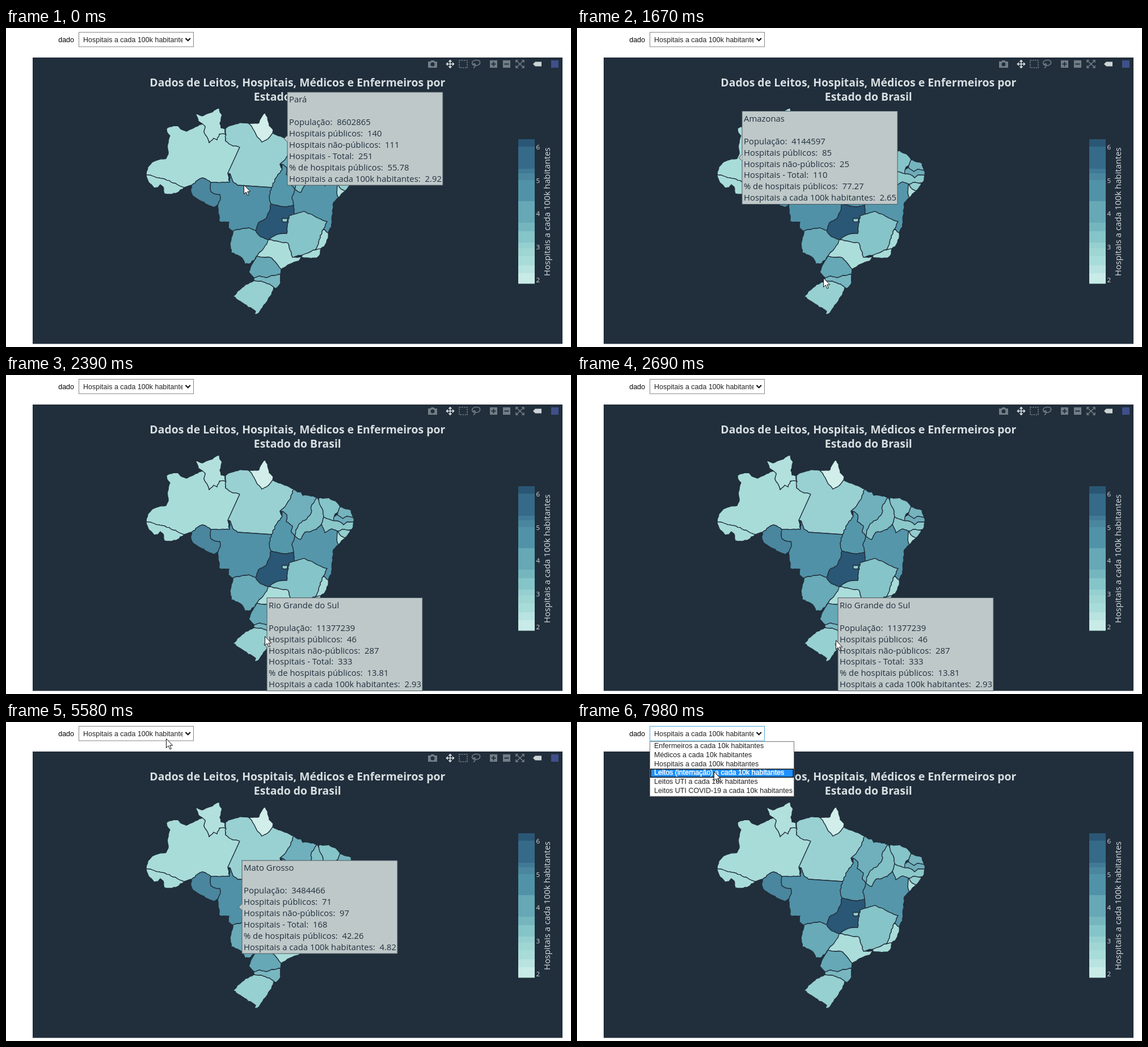
Recreate the animation shown at these times as an HTML page. Size 996 by 562 pixels, loop 8000 ms.

```html
<!DOCTYPE html>
<html lang="pt">
<head>
<meta charset="utf-8">
<title>Hospitais por estado</title>
<style>
  html, body { margin: 0; width: 100%; height: 100%; overflow: hidden; background: #fff; }
  svg { display: block; width: 100%; height: 100%; }
  .ui { font: 12.5px "Liberation Sans", Arial, sans-serif; fill: #222; }
  .plot { font: 14.8px "Open Sans", "Noto Sans", sans-serif; fill: #d8dfe2; }
  .title { font-size: 19.4px; font-weight: 700; text-anchor: middle; }
  .ticks { font-size: 11.6px; }
  #map { stroke: #212e3b; stroke-width: 1.3; stroke-linejoin: round; }
  #tip rect, #tip path { fill: #bec8c8; stroke: #4c5a62; }
  #tip text { fill: #22303f; font-size: 14.88px; }
  #bar { fill: none; stroke: #727e87; stroke-width: 1.6; }
  #bar .solid { fill: #727e87; stroke: none; }
</style>
</head>
<body>
<svg viewBox="0 0 996 562">
  <rect width="996" height="562" fill="#fff"/>
  <rect x="47" y="52" width="934" height="504.5" fill="#212e3b"/>

  <g class="plot">
    <g class="title">
      <text x="513.8" y="103">Dados de Leitos, Hospitais, Médicos e Enfermeiros por</text>
      <text x="513.8" y="128">Estado do Brasil</text>
    </g>
    <g id="scale"></g>
    <g id="ticks" class="ticks"></g>
    <text transform="translate(958.5 437) rotate(-90)">Hospitais a cada 100k habitantes</text>
  </g>

  <g id="map">
    <polygon fill="#a8dcd9" points="283,177 288,174 303,172 308,178 318,182 331,176 340,171 350,169 351,173 349,183 353,190 358,202 366,194 372,197 376,187 387,187 387,199 397,206 412,210 391,256 394,272 361,272 355,268 346,264 338,268 327,277 314,281 302,276 280,266 262,262 247,258 250,245 257,237 269,232 282,230 286,222 285,205 289,190 284,184"/>
    <polygon fill="#b2e0dd" points="334,151 345,155 352,152 364,148 372,142 376,141 377,148 381,153 379,160 377,168 379,176 386,178 387,187 376,187 372,197 366,194 358,202 353,190 349,183 351,173 345,168 339,164 337,157"/>
    <polygon fill="#a8dcd9" points="247,258 262,262 280,266 302,276 314,281 302,290 292,293 279,292 277,280 272,276 268,281 261,282 251,271"/>
    <polygon fill="#99d1d2" points="387,177 392,173 405,169 417,167 428,168 437,180 443,192 451,201 462,195 470,185 480,190 491,194 507,201 502,216 492,232 483,240 487,249 476,264 468,281 408,277 400,271 395,257 391,256 412,210 397,206 387,199"/>
    <polygon fill="#d1eeea" points="428,168 436,168 446,167 451,156 457,149 461,157 464,172 471,179 470,185 462,195 451,201 443,192 437,180"/>
    <polygon fill="#4a869e" points="327,277 338,268 346,264 355,268 361,272 361,288 367,292 377,293 378,302 374,311 367,316 355,311 342,304 331,297 326,288"/>
    <polygon fill="#5091a7" points="361,272 394,272 395,257 400,271 408,277 468,281 464,296 467,310 465,322 458,336 445,343 440,357 428,352 408,355 400,358 392,352 393,342 376,341 374,318 374,311 378,302 377,293 367,292 361,288"/>
    <polygon fill="#5597aa" points="487,240 495,246 494,258 505,266 503,277 509,284 504,300 507,312 495,315 480,313 467,310 464,296 468,281 476,264 487,249"/>
    <polygon fill="#6fb0bc" points="507,201 514,206 520,206 523,212 534,212 549,216 544,222 538,232 538,243 530,254 517,262 511,273 509,284 503,277 505,266 494,258 495,246 487,240 483,240 492,232 502,216"/>
    <polygon fill="#82c1c6" points="549,216 554,230 559,240 560,250 556,263 547,272 537,276 527,277 519,290 509,284 511,273 517,262 530,254 538,243 538,232 544,222"/>
    <polygon fill="#85c4c8" points="551,217 569,216 584,225 589,232 585,242 580,245 578,257 560,250 559,240 554,230"/>
    <polygon fill="#75b3bd" points="585,242 589,232 600,236 608,238 612,251 600,249 594,253 584,246"/>
    <polygon fill="#6dacb8" points="578,250 584,246 594,253 600,249 612,251 613,259 601,259 595,264 587,258 578,257"/>
    <polygon fill="#8ac8ca" points="560,250 578,257 587,258 595,264 601,259 613,259 612,268 607,273 597,272 584,275 574,271 562,278 556,263"/>
    <polygon fill="#93cdce" points="584,275 597,272 607,273 606,277 598,287 588,281"/>
    <polygon fill="#b0dfdc" points="584,275 588,281 598,287 586,299 583,290"/>
    <polygon fill="#5596aa" points="509,284 519,290 527,277 537,276 547,272 556,263 562,278 574,271 584,275 583,290 586,299 577,308 575,330 574,350 568,361 560,354 566,341 550,335 540,329 525,323 508,328 507,312 504,300"/>
    <polygon fill="#2a5775" points="467,310 480,313 495,315 507,312 508,328 499,331 496,350 495,362 478,364 462,373 449,368 440,357 445,343 458,336 465,322"/>
    <polygon fill="#85c4c8" points="499,331 508,328 525,323 540,329 550,335 566,341 560,354 554,366 551,380 545,391 527,398 505,404 501,392 497,379 480,376 462,373 478,364 495,362 496,350"/>
    <polygon fill="#93cdce" points="487,335 496,335 496,341 487,341"/>
    <polygon fill="#a8dcd9" points="560,354 568,361 568,370 561,385 554,390 545,391 551,380 554,366"/>
    <polygon fill="#a8dcd9" points="545,391 555,389 554,398 548,405 530,405 518,405 527,398"/>
    <polygon fill="#abdddA" points="462,373 480,376 497,379 501,392 505,404 522,403 515,411 500,416 485,425 477,415 468,405 442,402 452,391"/>
    <polygon fill="#68aab7" points="400,358 408,355 428,352 440,357 449,368 462,373 460,380 452,391 442,402 432,414 421,416 416,405 408,400 397,396 395,380"/>
    <polygon fill="#66a8b6" points="442,402 468,405 477,415 485,425 484,434 468,436 458,440 448,437 437,440 428,430 435,414"/>
    <polygon fill="#78b7c0" points="437,440 448,437 458,440 468,436 484,434 484,449 476,459 472,457 464,451 450,446 437,445"/>
    <polygon fill="#97d0d1" points="437,445 450,446 464,451 472,457 468,470 457,486 443,504 438,505 440,499 421,487 410,480 400,473 411,462 422,452"/>
  </g>

  <g id="bar">
    <path class="solid" fill-rule="evenodd" d="M744 59h4l2-2h4l2 2h4v11h-16zM748.500 64a3.500 3.500 0 1 0 7 0a3.500 3.500 0 1 0-7 0M853 57h13v13h-13zM855.500 62.500v2h3v3h2v-3h3v-2h-3v-3h-2v3zM876 57h13v13h-13zM878.500 62.500v2h8v-2z"/>
    <path d="M777 63.500h12M783 57.500v12M779 61l-2.500 2.500l2.500 2.500M787 61l2.500 2.500l-2.500 2.500M780.500 59.500l2.500-2.500l2.500 2.500M780.500 67.500l2.500 2.500l2.500-2.500" stroke="#dce2e5"/>
    <rect x="799" y="57" width="14" height="13" stroke-dasharray="2.500 1.600"/>
    <path d="M824 66c-6-6 1-10 6-9.500c8 .5 7 8.500 0 9.500c-5 .5-7-2-5-3c3-1 3 5-1 7.500"/>
    <path d="M899 61v-4h4M909 57h4v4M913 66v4h-4M903 70h-4v-4M900 58l12 11M912 58l-12 11"/>
    <path d="M929 63.500l4-4h11v8h-11z" fill="#ccd3d5" stroke="none"/>
    <rect x="961" y="57" width="13" height="13" fill="#3f4f8a" stroke="none"/>
  </g>

  <g id="tip" class="plot">
    <rect x="6" y="-82" width="274" height="164"/>
    <path d="M6.500-6L0 0L6.500 6" />
  </g>

  <g class="ui">
    <text x="120" y="25" text-anchor="end" fill="#000">dado</text>
    <rect id="field" x="128.500" y="7.500" width="202" height="25.500" fill="#fff"/>
    <clipPath id="clip"><rect x="130" y="9" width="182" height="23"/></clipPath>
    <text x="136" y="25" clip-path="url(#clip)">Hospitais a cada 100k habitantes</text>
    <path d="M316.500 18l4.200 4.200l4.200-4.200" fill="none" stroke="#111" stroke-width="2.200"/>
  </g>
  <g id="menu" class="ui">
    <rect x="128.500" y="34.500" width="254" height="96.500" fill="#fff" stroke="#767676"/>
    <rect id="pick" x="129.700" width="251.600" height="14.200" fill="#1e90ff" stroke="#10151c" stroke-width="1.600"/>
  </g>
  <path id="cursor" d="M0 0v16l3.700-3.500l2.800 6l2.400-1l-2.700-5.800h5z" fill="#fff" stroke="#111" stroke-width="1"/>
</svg>

<script>
const LOOP = 8000, ROW = 15.75;
const $ = id => document.getElementById(id);

function add(parent, name, attrs, text = '') {
  const el = document.createElementNS('http://www.w3.org/2000/svg', name);
  for (const k in attrs) el.setAttribute(k, attrs[k]);
  el.textContent = text;
  return parent.appendChild(el);
}

// Offset depends on place only, so neighbouring states share their borders.
const noise = (x, y) => {
  const s = Math.sin(Math.round(x * 4) * 12.9898 + Math.round(y * 4) * 78.233) * 43758.5453;
  return (s - Math.floor(s) - 0.5) * 1.9;
};

function roughen(poly) {
  const pts = poly.getAttribute('points').split(' ').map(p => p.split(',').map(Number));
  const out = [];
  pts.forEach(([x, y], i) => {
    const [u, v] = pts[(i + 1) % pts.length];
    const len = Math.hypot(u - x, v - y);
    const n = len > 33 || len < 7 ? 1 : Math.round(len / 4);
    out.push([x, y]);
    for (let k = 1; k < n; k++) {
      const px = x + (u - x) * k / n, py = y + (v - y) * k / n;
      out.push([px + noise(px, py), py + noise(py, px)]);
    }
  });
  poly.setAttribute('points', out.join(' '));
}
document.querySelectorAll('#map polygon').forEach(roughen);

// Colour scale: top edge and colour of each band
const bands = [
  [196, '#2a5775'], [209, '#356a88'], [248, '#417a96'], [256, '#4a879e'], [268, '#5093a8'],
  [305, '#66a8b6'], [343, '#75b6be'], [358, '#85c4c8'], [378, '#96cfd0'], [388, '#9fd6d4'],
  [402, '#a8dcd9'], [418, '#b8e3e0'], [432, '#c8ebe7'], [450.5]
];
bands.slice(0, -1).forEach(([y, fill], i) =>
  add($('scale'), 'rect', { x: 903, y, width: 29, height: bands[i + 1][0] - y, fill }));
for (let n = 2; n <= 6; n++) add($('ticks'), 'text', { x: 934.5, y: 565.2 - n * 58.5 }, n);

const options = [
  'Enfermeiros a cada 10k habitantes', 'Médicos a cada 10k habitantes',
  'Hospitais a cada 100k habitantes', 'Leitos (internação) a cada 10k habitantes',
  'Leitos UTI a cada 10k habitantes', 'Leitos UTI COVID-19 a cada 10k habitantes'
].map((s, i) => add($('menu'), 'text', { x: 136, y: 46.2 + i * ROW }, s));

// Anchor, name, population, public and private hospitals
const states = {
  PA: [490, 195, 'Pará', 8602865, 140, 111],
  AM: [285, 228.5, 'Amazonas', 4144597, 85, 25],
  RO: [345, 293, 'Rondônia', 1777225, 53, 38],
  MS: [419, 380, 'Mato Grosso do Sul', 2778986, 22, 91],
  RS: [454, 474.5, 'Rio Grande do Sul', 11377239, 46, 287],
  SC: [482, 448, 'Santa Catarina', 7164788, 48, 202],
  MT: [410, 326, 'Mato Grosso', 3484466, 71, 97]
};
const lines = Array.from({ length: 8 }, (_, i) =>
  add($('tip'), 'text', { x: 9, y: -63.7 + i * 19.93 }));

function showTip(id) {
  $('tip').style.display = id ? '' : 'none';
  if (!id) return;
  const [x, y, name, people, pub, priv] = states[id], sum = pub + priv;
  $('tip').setAttribute('transform', `translate(${x} ${y})`);
  [name, '', 'População:  ' + people, 'Hospitais públicos:  ' + pub,
    'Hospitais não-públicos:  ' + priv, 'Hospitais - Total:  ' + sum,
    '% de hospitais públicos:  ' + (pub / sum * 100).toFixed(2),
    'Hospitais a cada 100k habitantes:  ' + (sum / people * 1e5).toFixed(2)
  ].forEach((s, i) => lines[i].textContent = s.replace(/ {2}/, '\u00a0\u00a0'));
}

function showMenu(row) {
  const open = row >= 0;
  $('menu').style.display = open ? '' : 'none';
  $('field').setAttribute('stroke', open ? '#4fa9de' : '#858585');
  $('pick').setAttribute('y', 35.8 + row * ROW);
  options.forEach((el, i) => {
    el.style.fill = i === row ? '#fff' : '';
    el.style.stroke = i === row ? '#fff' : 'none';
    el.style.strokeWidth = 0.45;
  });
}

const moveCursor = p => $('cursor').setAttribute('transform', `translate(${p[0] + 0.5} ${p[1] + 0.5})`);
const fadeBar = o => $('bar').style.opacity = o;

// Each track: setter, then steps of [start ms, value]
const tracks = [
  [moveCursor, [
    [0, [419, 276]], [400, [396, 256]], [540, [361, 234]], [690, [354, 230]], [820, [351, 229]],
    [1520, [398, 367]], [1670, [434, 440]], [1810, [446, 448]], [2090, [448, 448]],
    [2390, [456, 460]], [2540, [456, 467]], [5130, [421, 369]], [5280, [305, 118]],
    [5430, [284, 58]], [5580, [282, 29]], [5730, [282, 28]], [6130, [279, 23]], [6250, [278, 21]],
    [6520, [277, 35]], [6810, [273, 52]], [6930, [270, 69]], [7090, [267, 90]], [7220, [265, 106]],
    [7590, [259, 102]], [7730, [242, 87]], [7980, [241, 87]]]],
  [showTip, [
    [0, 'PA'], [970, 'AM'], [1810, 'RO'], [1960, 'MS'], [2390, 'RS'], [2540, 'SC'],
    [2690, 'RS'], [5580, 'MT'], [5730, '']]],
  [showMenu, [[0, -1], [6520, 2], [6810, 1], [6930, 2], [7090, 3], [7220, 4], [7730, 3]]],
  [fadeBar, [[0, 1], [6130, 0.5], [6250, 0]]]
].map(([set, steps]) => ({ set, steps, at: -1 }));

function frame() {
  const t = performance.now() % LOOP;
  for (const track of tracks) {
    const i = track.steps.filter(s => s[0] <= t).length - 1;
    if (i !== track.at) track.set(track.steps[track.at = i][1]);
  }
  requestAnimationFrame(frame);
}
frame();
</script>
</body>
</html>
```
